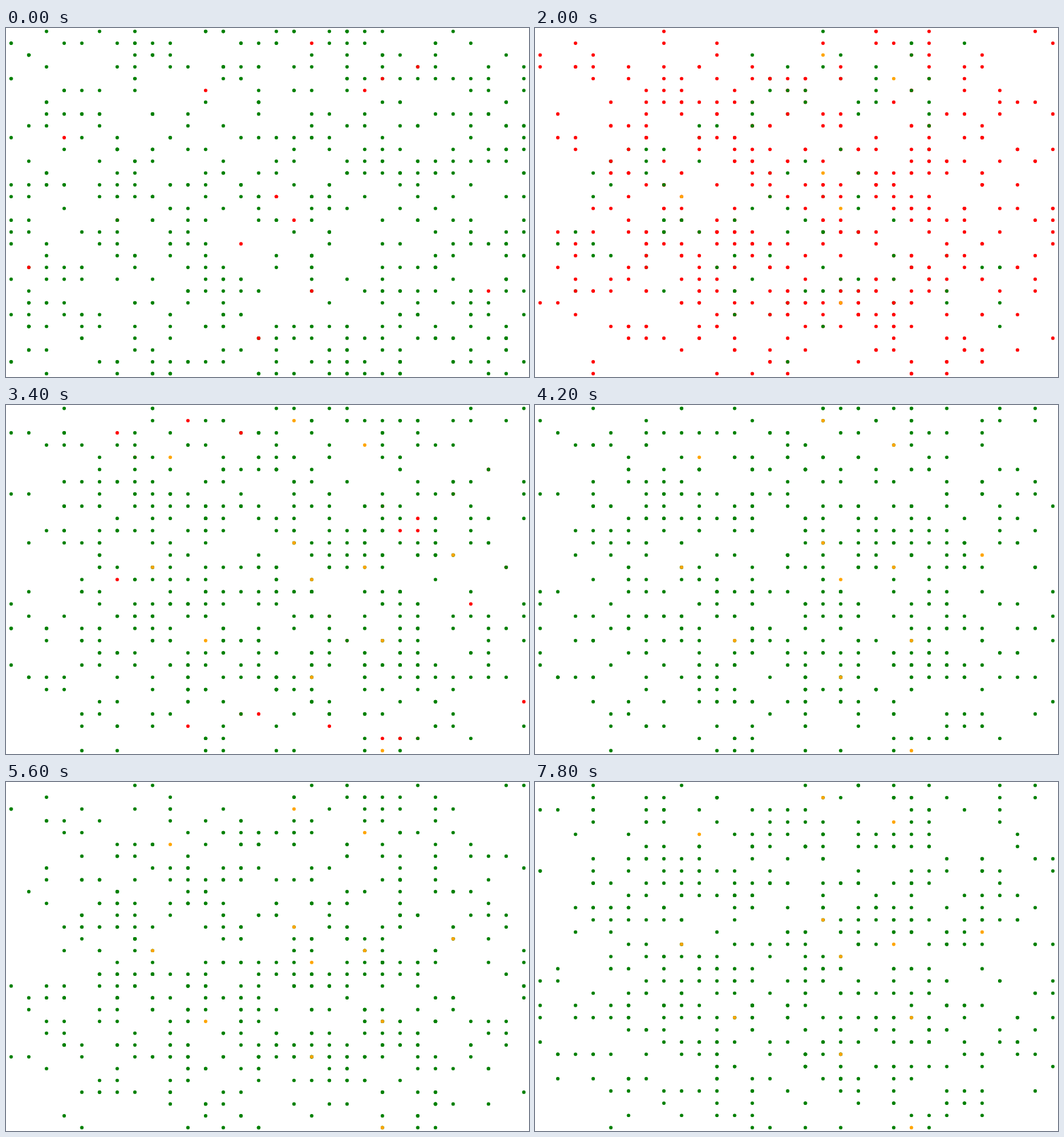
An HTML page with a canvas that plays this animation: 864x576 px, repeating every 8 s.

```html
<!DOCTYPE html>
<html lang="en">
<head>
<meta charset="utf-8">
<title>Epidemic on a grid</title>
<style>
  html, body { margin: 0; width: 100%; height: 100%; overflow: hidden; background: #fff; }
  canvas { display: block; }
</style>
</head>
<body>
<canvas id="stage" width="864" height="576"></canvas>
<script>
const ctx = document.getElementById('stage').getContext('2d');
const STEP = 200, STEPS = 40;
const LAST = 29, MID = LAST / 2;
const CROWD = 560, CARRIERS = 15;
const SETTLED = 6, ILLNESS = 7;
const GREEN = '#008000', RED = '#ff0000', ORANGE = '#ffa500';

// Resting cells of the agents that die: [column, height above the bottom row].
const graves = [[16, 27], [20, 25], [9, 24], [16, 17], [25, 16], [8, 15], [20, 15],
  [17, 14], [11, 9], [21, 9], [17, 6], [21, 0]];

// Repeatable random number in [0, 1) for a set of integers.
function noise(a, b = 0, c = 0) {
  let h = Math.imul(a + 11, 0x9e3779b1) ^ Math.imul(b + 37, 0x85ebca6b) ^ Math.imul(c + 5, 0xc2b2ae35);
  h = Math.imul(h ^ h >>> 16, 0x7feb352d);
  h = Math.imul(h ^ h >>> 15, 0x846ca68b);
  return ((h ^ h >>> 16) >>> 0) / 4294967296;
}
const spread = (range, ...key) => (noise(...key) * 2 - 1) * range;
const clamp = (v, max = LAST) => Math.max(0, Math.min(max, Math.round(v)));
const lerp = (a, b, t) => a + (b - a) * t;
const distance = (a, b) => Math.hypot(a[0] - b[0], a[1] - b[1]);

const randomCell = id => [0, 1].map(axis => Math.floor(noise(id, 1, axis) * (LAST + 1)));
const pullInward = (cell, id) => cell.map((v, axis) => clamp(lerp(MID, v, 0.82) + spread(4, id, 2, axis)));
const nearby = (cell, id) => cell.map((v, axis) => clamp(v + spread(3, id, 3, axis)));

const firstCarrier = CROWD - CARRIERS;
const sources = Array.from({ length: CARRIERS }, (_, i) => randomCell(firstCarrier + i));

function makeAgent(id) {
  const mortal = id >= CROWD;
  const carrier = !mortal && id >= firstCarrier;
  const grave = graves[id - CROWD];
  const start = mortal ? nearby(grave, id) : randomCell(id);
  const home = grave ?? pullInward(start, id);
  const sway = [0, 1].map(axis => noise(id, 4, axis) < 0.5 ? -1 : 1);

  const reach = Math.min(...sources.map(cell => distance(cell, start)));
  const late = !mortal && noise(id, 5) < 0.05;
  const infected = carrier ? 0
    : late ? SETTLED + 1
    : Math.min(SETTLED, Math.ceil(reach * 0.8 + noise(id, 6) * 2));

  // Illness lasts longer for some, mostly far from the centre.
  const edge = distance(home, [MID, MID]) / MID;
  const slow = !mortal && noise(id, 7) < 0.04 + 0.18 * edge * edge;
  const healed = infected + ILLNESS + (slow ? 2 + Math.floor(noise(id, 8) * 5) : 0);
  return { id, mortal, start, home, sway, infected, healed };
}
const agents = Array.from({ length: CROWD + graves.length }, (_, id) => makeAgent(id));

function colorAt({ infected, healed, mortal }, step) {
  if (step < infected) return GREEN;
  if (step < healed) return RED;
  return mortal ? ORANGE : GREEN;
}

// Agents drift inward, then sway between two cells with small detours.
function cellAt({ id, mortal, start, home, sway, healed }, step, top) {
  if (mortal && step >= healed) return home;
  const detour = step > 0 && noise(id, step, 9) < 0.35;
  return home.map((target, axis) => {
    let v = lerp(start[axis], target, Math.min(1, step / SETTLED));
    if (step % 2) v += sway[axis];
    if (detour) v += Math.round(spread(1.5, id, step, 10 + axis));
    return clamp(v, axis ? top : LAST);
  });
}

function draw(step) {
  // The vertical scale follows the tallest occupied row.
  const top = step % 2 ? LAST - 1 : LAST;
  ctx.fillStyle = '#fff';
  ctx.fillRect(0, 0, 864, 576);
  for (const agent of agents) {
    const [col, height] = cellAt(agent, step, top);
    ctx.fillStyle = colorAt(agent, step);
    ctx.beginPath();
    ctx.arc(lerp(8.5, 855.5, col / LAST), lerp(570.4, 5.6, height / top), 2.85, 0, Math.PI * 2);
    ctx.fill();
  }
}

const began = performance.now();
let shown = -1;
function tick() {
  const step = Math.floor((performance.now() - began) / STEP) % STEPS;
  if (step !== shown) draw(shown = step);
  requestAnimationFrame(tick);
}
tick();
</script>
</body>
</html>
```
